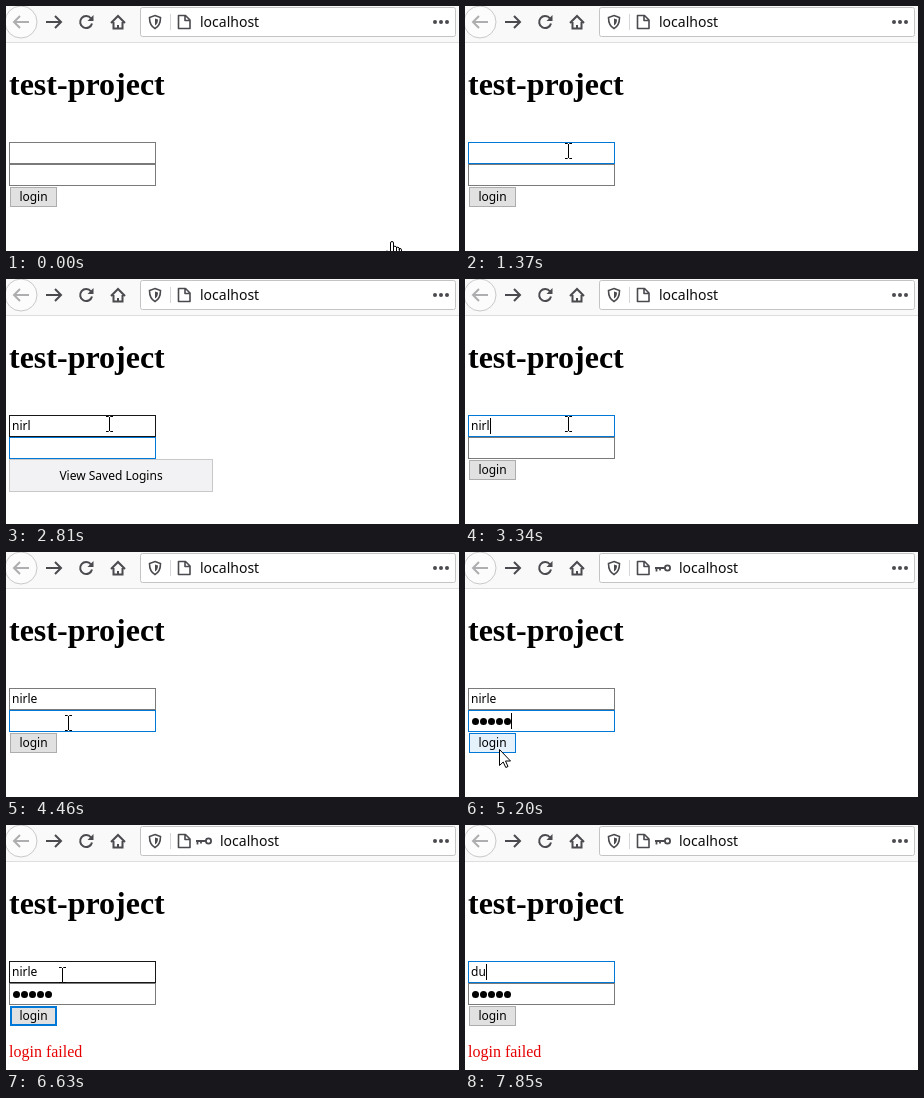
Write an HTML page that moves like this. It is 453 by 245 pixels and loops after 8 s.

```html
<!DOCTYPE html>
<html lang="en">
<head>
<meta charset="utf-8">
<title>Login form</title>
<style>
  html, body { margin: 0; width: 100%; height: 100%; overflow: hidden; background: #fff; }
  #stage { position: relative; width: 453px; height: 245px; overflow: hidden; font: 12px/16px "Noto Sans", sans-serif; color: #000; }
  #stage > * { position: absolute; box-sizing: border-box; margin: 0; white-space: pre; }
  svg { left: 0; top: 0; }
  h1 { left: 3px; top: 60px; font: bold 32px/36px "Liberation Serif", serif; }
  #failed { left: 3px; top: 218px; font: 16px/18px "Liberation Serif", serif; color: #e60000; }
  .field { left: 3px; width: 147px; height: 22px; padding: 2px; border: 1px solid #7a7a7a; background: #fff; display: flex; }
  .field.hover { border-color: #171717; }
  .field.focus { border-color: #0078d7; }
  #user { top: 136px; }
  #pass { top: 158px; }
  .field i { width: 7px; height: 7px; margin: 5px .5px; border-radius: 50%; background: #000; }
  .field b { width: 1px; height: 16px; background: #000; }
  .field mark { background: #0078d7; color: #fff; }
  #login { left: 4px; top: 181px; width: 47px; height: 20px; line-height: 18px; text-align: center; border: 1px solid #adadad; background: #e1e1e1; }
  #login.focus { border: 2px solid #0078d7; line-height: 16px; }
  #login.hover { border: 1px solid #0078d7; background: #e5f1fb; line-height: 18px; }
  #login.pressed { border: 1px solid #005499; background: #cce4f7; line-height: 18px; }
  #popup { left: 3px; top: 180px; width: 204px; height: 33px; line-height: 31px; text-align: center; border: 1px solid #c8c8c8; background: #f2f2f4; }
</style>
</head>
<body>
<div id="stage">
  <svg width="453" height="245" fill="none" stroke="#4a4a4f" stroke-width="2">
    <path d="M0 0H453V37H0Z" fill="#f9f9fa" stroke="none"/>
    <path d="M0 36.5H453" stroke="#dededf" stroke-width="1"/>
    <circle cx="15" cy="16" r="16" fill="#fcfcfc" stroke="#c9c9ca" stroke-width="1"/>
    <path d="M8 16H23M14 10L8 16L14 22" stroke="#aeaeb0"/>
    <path d="M40 16H55M49 10L55 16L49 22"/>
    <path d="M85 12.5A6 6 0 1 0 86 17.5"/>
    <path d="M87.500 9V15H81.500Z" fill="#4a4a4f" stroke="none"/>
    <path d="M105 17L112 10L119 17M107.500 16V22.500H116.500V16"/>
    <path d="M112 19V23"/>
    <rect x="134.500" y="1.500" width="315" height="29" rx="2" fill="#fff" stroke="#c4c4c5" stroke-width="1"/>
    <path d="M149 9.500L154.500 11.500C154.500 17 153 20.500 149 22.500C145 20.500 143.500 17 143.500 11.500Z" stroke-width="1.600"/>
    <path d="M149 12.500L152 13.500C152 16.500 151 18.500 149 19.500Z" fill="#4a4a4f" stroke="none"/>
    <path d="M164.500 8V24" stroke="#d7d7db" stroke-width="1"/>
    <path d="M172.500 9.500H179.500L184 14V22.500H172.500ZM179 9.500V14.500H184" stroke-width="1.600" stroke-linejoin="round"/>
    <g id="key" stroke-width="1.800">
      <circle cx="202.500" cy="16" r="2.600"/>
      <path d="M200 16H190M191.500 16V19.500M195 16V18.500"/>
    </g>
    <g fill="#4a4a4f" stroke="none">
      <circle cx="429" cy="16" r="2"/><circle cx="435" cy="16" r="2"/><circle cx="441" cy="16" r="2"/>
    </g>
    <text id="address" y="21" font-family="Noto Sans, sans-serif" font-size="14" fill="#0c0c0d" stroke="none">localhost</text>
  </svg>
  <h1>test-project</h1>
  <div id="user" class="field"></div>
  <div id="pass" class="field"></div>
  <div id="login">login</div>
  <div id="failed">login failed</div>
  <div id="popup">View Saved Logins</div>
  <svg width="453" height="245">
    <g id="pointer" fill="#fff" stroke="#000">
      <path id="arrow" d="M.5 .5V16.500L4.200 13L6.800 18.500L9 17.500L6.500 12H11.500Z"/>
      <path id="hand" d="M5.500 13V2A1.500 1.500 0 0 1 8.500 2V7V5.500Q10 4.500 11.500 6V8V6.500Q13 5.500 14.300 7V9V7.500Q16.500 7 16.500 9V15L14.500 21H7L1 12.500Q0 9.500 2.500 10ZM8.500 7V10M11.500 8V10.500M14.300 9V11"/>
      <path id="beam" d="M-3 -7.500H-.5L.5 -6.500L1.500 -7.500H4M.5 -7V7M-3 7.500H-.5L.5 6.500L1.500 7.500H4" fill="none"/>
    </g>
  </svg>
</div>
<script>
const LOOP = 8000;
const byId = id => document.getElementById(id);
const at = (kind, x, y) => ({ pointer: kind, x, y });

const START = {
  ...at('hand', 379, 235), user: '', dots: 0, focus: '', hover: '',
  caret: false, marked: 0, pressed: false, popup: false, failed: false
};

// Each step lists only what changes from that moment on.
const STEPS = [
  [100, at('arrow', 352, 218)],
  [210, at('arrow', 270, 190)],
  [310, at('arrow', 180, 166)],
  [420, { ...at('beam', 118, 149), hover: 'user' }],
  [520, at('beam', 103, 145)],
  [720, { focus: 'user' }],
  [820, { caret: true }],
  [1370, { caret: false }],
  [1590, { user: 'n', caret: true }],
  [1710, { user: 'ni' }],
  [1930, { user: 'nir' }],
  [2030, { user: 'nirl' }],
  [2260, { focus: 'pass' }],
  [2810, { caret: false, popup: true }],
  [3340, { focus: 'user', caret: true, popup: false }],
  [3570, { user: 'nirle' }],
  [3680, at('beam', 98, 150)],
  [3790, { ...at('beam', 88, 165), hover: 'pass' }],
  [3900, { ...at('beam', 82, 169), focus: 'pass' }],
  [4010, at('beam', 80, 169)],
  [4460, { ...at('beam', 62, 171), caret: false }],
  [4570, { ...at('arrow', 38, 192), hover: 'login' }],
  [4670, { ...at('arrow', 34, 197), dots: 1, caret: true }],
  [4780, { dots: 2 }],
  [4880, { dots: 3 }],
  [5100, { dots: 4 }],
  [5200, { dots: 5 }],
  [5450, { focus: 'login', caret: false, pressed: true }],
  [5650, { pressed: false, failed: true }],
  [6180, at('arrow', 36, 190)],
  [6300, { ...at('beam', 46, 168), hover: 'pass' }],
  [6410, { ...at('beam', 54, 153), hover: 'user' }],
  [6630, at('beam', 56, 150)],
  [6740, { ...at('beam', 22, 154), focus: 'user', marked: 2 }],
  [6860, { ...at('beam', 6, 157), marked: 5 }],
  [7390, { pointer: '', hover: '' }],
  [7710, { user: 'd', marked: 0, caret: true }],
  [7850, { user: 'du' }]
];

const show = (id, on) => { byId(id).style.display = on ? '' : 'none'; };

function render(s) {
  const split = s.user.length - s.marked;
  const caretIn = id => s.caret && s.focus === id ? '<b></b>' : '';
  const mark = s.marked ? `<mark>${s.user.slice(split)}</mark>` : '';
  byId('user').innerHTML = `<span>${s.user.slice(0, split)}</span>${mark}${caretIn('user')}`;
  byId('pass').innerHTML = '<i></i>'.repeat(s.dots) + caretIn('pass');

  for (const id of ['user', 'pass', 'login']) {
    const classes = byId(id).classList;
    classes.toggle('hover', s.hover === id);
    classes.toggle('focus', s.focus === id);
  }
  byId('login').classList.toggle('pressed', s.pressed);

  show('key', s.dots);
  byId('address').setAttribute('x', s.dots ? 214 : 194);
  show('failed', s.failed);
  show('popup', s.popup);
  for (const kind of ['arrow', 'hand', 'beam']) show(kind, s.pointer === kind);
  byId('pointer').setAttribute('transform', `translate(${s.x} ${s.y})`);
}

const startTime = performance.now();
let shown = -1;

function tick() {
  const t = (performance.now() - startTime) % LOOP;
  const past = STEPS.filter(([time]) => time <= t);
  if (past.length !== shown) {
    shown = past.length;
    render(Object.assign({}, START, ...past.map(([, change]) => change)));
  }
  requestAnimationFrame(tick);
}
tick();
</script>
</body>
</html>
```
